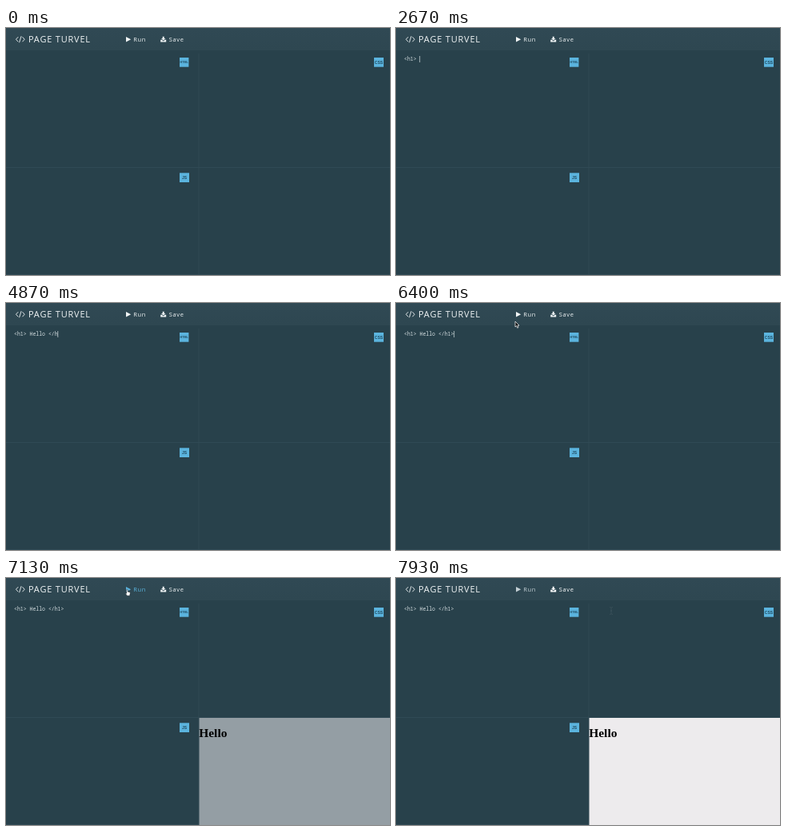
Recreate the animation shown at these times as an HTML page. Size 480 px wide and 309 px high, loop 8 s.

```html
<!DOCTYPE html>
<html lang="en">
<head>
<meta charset="utf-8">
<title>Code editor</title>
<style>
html, body { margin: 0; width: 100%; height: 100%; overflow: hidden; background: #28414b; }
svg { display: block; width: 480px; height: 309px; }
text { white-space: pre; }
.ui { font-family: "Open Sans", sans-serif; }
.title { font-size: 11px; letter-spacing: .8px; fill: #f0f4f5; }
.button { font-size: 7.5px; letter-spacing: .7px; }
.code { font: 6.5px "Noto Sans Mono", monospace; fill: #d3dcdf; }
.badge { font-family: "Liberation Sans", Arial, sans-serif; font-weight: bold; text-anchor: middle; fill: #1f4a60; }
.result { font: bold 15.4px "Liberation Serif", Times, serif; }
.line { stroke: #304a55; }
</style>
</head>
<body>
<svg viewBox="0 0 480 309">
  <defs>
    <linearGradient id="bar" x2="0" y2="1">
      <stop stop-color="#304954"/>
      <stop offset="1" stop-color="#2e4751"/>
    </linearGradient>
  </defs>
  <rect width="480" height="309" fill="#28414b"/>
  <rect width="480" height="28" fill="url(#bar)"/>
  <path class="line" d="M241 32V309M0 174.5H480M0 308.5H480"/>

  <path d="M15.2 11.2L12.5 14.2L15.2 17.2M19.1 10.2L16.6 18.2M20.5 11.2L23.2 14.2L20.5 17.2" fill="none" stroke="#f0f4f5" stroke-width=".9"/>
  <text class="ui title" x="28" y="18">PAGE TURVEL</text>
  <g class="ui button" id="run">
    <path d="M150 11L156.2 14.2L150 17.4Z"/>
    <text x="159.2" y="17">Run</text>
  </g>
  <g class="ui button" id="save">
    <path d="M195.7 10.7H197.7V13H199.4L196.7 15.5L194 13H195.7ZM193.2 14.8H194.8L196.7 16.4L198.6 14.8H200.2V17.4H193.2Z"/>
    <text x="203.7" y="17">Save</text>
  </g>

  <g id="badges"></g>
  <text class="code" id="code" x="10" y="41.2"></text>
  <path id="caret" d="M0 35V43" stroke="#dce4e7" stroke-width=".7"/>

  <g id="output">
    <rect id="page" x="241.5" y="175" width="238.5" height="134"/>
    <text class="result" x="241.3" y="199">Hello</text>
  </g>

  <g id="arrow"><path d="M0 0V7L1.6 5.6L2.7 8.2L4 7.6L2.9 5.1H5Z" fill="#111" stroke="#fff" stroke-width=".7"/></g>
  <g id="hand"><path d="M-.8 .2Q0-.6 .7 .2V2.6L3.2 3.3Q4 3.6 3.8 4.6L3.2 7.7H-.2L-2 5.2Q-2.2 4.2-.8 4.7Z" fill="#fff" stroke="#15232a" stroke-width=".6"/></g>
  <g id="beam"><path d="M-2-4.5Q0-4.5 0-3.5V3.5Q0 4.5-2 4.5M2-4.5Q0-4.5 0-3.5M0 3.5Q0 4.5 2 4.5M-1 0H1" fill="none" stroke="#4b5d66" stroke-width=".8" opacity=".6"/></g>
</svg>
<script>
const LOOP = 8000;
const CODE = "<h1> Hello </h1>";
// When each character is typed
const KEYS = [1600, 1800, 2000, 2330, 2470, 2800, 3000, 3270, 3400, 3600, 3800, 4000, 4400, 4870, 5130, 5400];
const FIRST_BLINK = 470, BLUR = 6870, HOVER = 6670, RUN = 6895, FADE = 445;
// Pointer: time, x, y
const PATH = [[70, 100, 228], [870, 49, 55], [5870, 49, 55], [6400, 149, 23],
  [6670, 151.5, 14.5], [7600, 151.5, 14.5], [7930, 269, 41], [LOOP, 269, 41]];
const BLUE = [91, 180, 222], WHITE = [240, 244, 245], GREY = [195, 207, 212];
const DARK = [40, 65, 75], PAPER = [237, 235, 237];

const $ = id => document.getElementById(id);
const show = (el, on) => el.style.display = on ? "" : "none";
const clamp = v => Math.min(1, Math.max(0, v));
const ease = p => (1 - Math.cos(Math.PI * p)) / 2;
const mix = (a, b, p) => `rgb(${a.map((v, i) => Math.round(v + (b[i] - v) * p))})`;

// Label, x, y, width, font size
$("badges").innerHTML = [["HTML", 217, 37, 11.4, 3.7], ["CSS", 460, 37, 12, 5], ["JS", 217, 181.3, 12, 5]]
  .map(([label, x, y, w, size]) => `<rect x="${x}" y="${y}" width="${w}" height="11.7" fill="#5bb4de"/>
    <text class="badge" x="${x + w / 2}" y="${y + 5.9 + size * .36}" font-size="${size}">${label}</text>`).join("");

function pointerAt(t) {
  const i = PATH.findIndex(p => p[0] > t);
  if (i < 1) return null;
  const [t0, x0, y0] = PATH[i - 1], [t1, x1, y1] = PATH[i];
  const p = ease((t - t0) / (t1 - t0));
  return [x0 + (x1 - x0) * p, y0 + (y1 - y0) * p];
}

function drawPointer(t) {
  const typing = t >= KEYS[0] && t < 5870;
  const at = typing ? null : pointerAt(t);
  let shape = "";
  if (at) {
    const [x, y] = at;
    shape = y > 28 ? "beam" : x > 147 && x < 178 && y < 19 ? "hand" : "arrow";
    $(shape).setAttribute("transform", `translate(${x} ${y})`);
  }
  for (const id of ["arrow", "hand", "beam"]) show($(id), id === shape);
}

function draw(t) {
  const typed = KEYS.filter(k => k <= t).length;
  $("code").textContent = CODE.slice(0, typed);

  const since = t - (typed ? KEYS[typed - 1] : FIRST_BLINK);
  show($("caret"), since >= 0 && since % 1000 < 500 && t < BLUR);
  $("caret").setAttribute("transform", `translate(${10.2 + 3.9 * typed})`);

  const leave = clamp((t - 7670) / 260);
  $("run").setAttribute("fill", t < HOVER ? mix(WHITE, WHITE, 0) : mix(BLUE, GREY, leave));
  $("save").setAttribute("fill", mix(WHITE, [255, 255, 255], leave));

  show($("output"), t >= RUN);
  $("page").setAttribute("fill", mix(DARK, PAPER, ease(clamp((t - RUN) / FADE))));
  drawPointer(t);
}

const start = performance.now();
function tick() {
  draw((performance.now() - start) % LOOP);
  requestAnimationFrame(tick);
}
tick();
</script>
</body>
</html>
```
